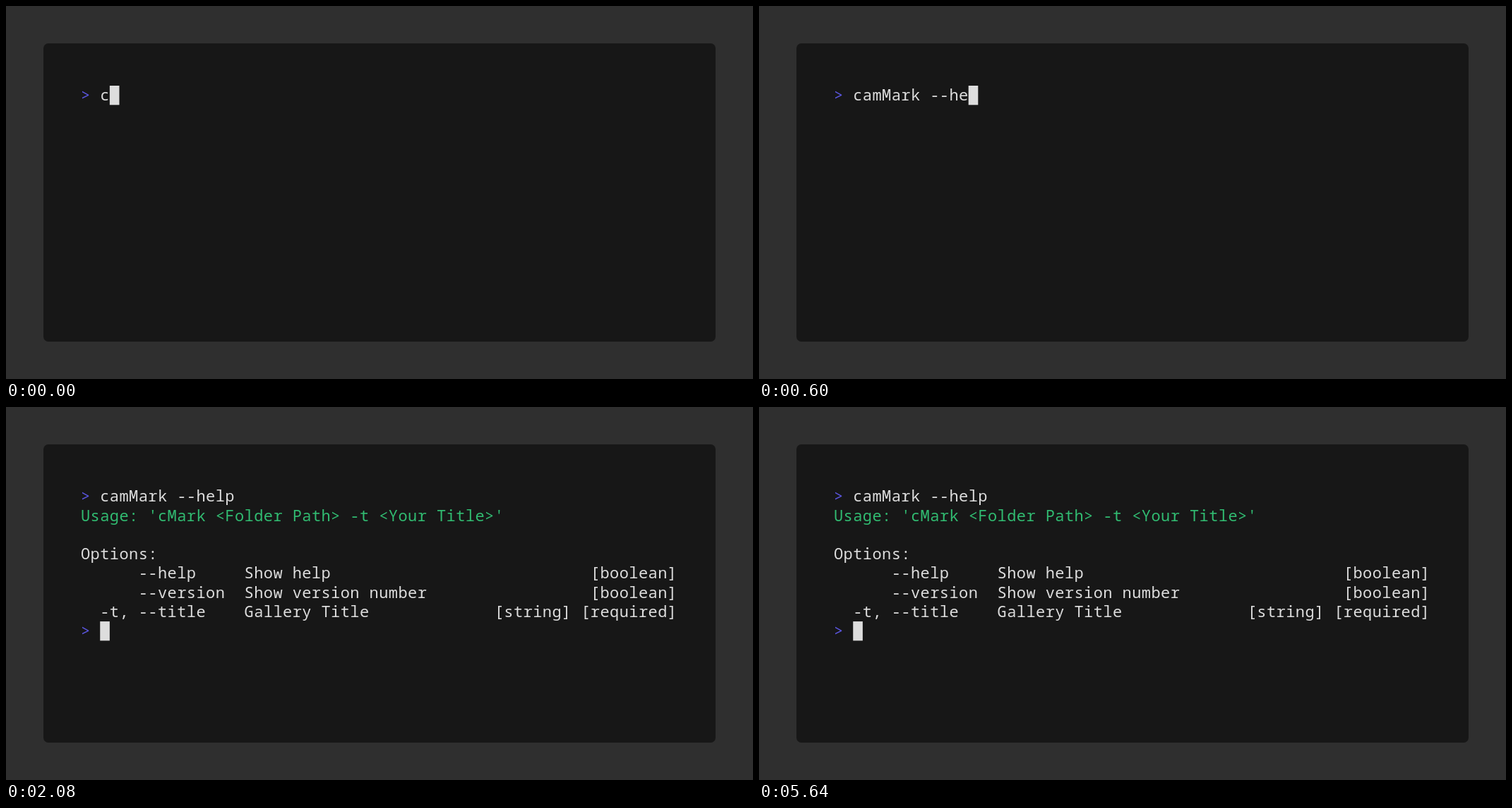
Write an HTML page that moves like this. It is 1058 by 529 pixels and loops after 5.76 s.

```html
<!DOCTYPE html>
<html lang="en">
<head>
<meta charset="utf-8">
<title>Terminal help</title>
<style>
  html, body { margin: 0; width: 100%; height: 100%; overflow: hidden; background: #2f2f2f; }
  svg { display: block; width: 1058px; height: 529px; }
  text {
    font: 22px "Noto Sans Mono", "DejaVu Sans Mono", monospace;
    letter-spacing: 0.42px;
    font-variant-ligatures: none;
    white-space: pre;
    fill: #ddd;
  }
  .prompt { fill: #5b56e0; }
  .usage { fill: #31bb71; }
  #cursor { fill: #ddd; }
</style>
</head>
<body>
<svg viewBox="0 0 1058 529">
  <rect x="53" y="53" width="952" height="423" rx="7" fill="#171717"/>
  <g id="screen"></g>
  <rect id="cursor"/>
</svg>
<script>
const LOOP = 5760;
const CELL = { w: 13.62, h: 27.3 };
const ORIGIN = { x: 106, y: 113 };
const BASELINE = 21.2;
const COMMAND = 'camMark --help';

// [time in ms, typed characters]
const KEYS = [[0, 1], [40, 2], [120, 3], [160, 4], [240, 5], [320, 7], [400, 8],
  [440, 9], [480, 10], [560, 11], [600, 12], [640, 13], [720, 14]];
const ENTER = 800;
const OUTPUT = 920;
const BLINKS = [1520, 2080, 2680, 3280, 3880, 4480, 5080, 5640];

const screen = document.getElementById('screen');
const cursor = document.getElementById('cursor');
const colX = col => ORIGIN.x + col * CELL.w;
const rowY = row => ORIGIN.y + row * CELL.h;

function addText(parent, col, row, content, cls = '') {
  const el = document.createElementNS('http://www.w3.org/2000/svg', 'text');
  el.setAttribute('x', colX(col));
  el.setAttribute('y', rowY(row) + BASELINE);
  el.setAttribute('class', cls);
  el.textContent = content;
  parent.append(el);
  return el;
}

addText(screen, 0, 0, '>', 'prompt');
const typed = addText(screen, 2, 0, '');

const output = document.createElementNS('http://www.w3.org/2000/svg', 'g');
screen.append(output);
addText(output, 0, 1, "Usage: 'cMark <Folder Path> -t <Your Title>'", 'usage');
addText(output, 0, 3, 'Options:');
[
  ['', '--help', 'Show help', '[boolean]'],
  ['-t,', '--version', 'Show version number', '[boolean]'],
  ['-t,', '--title', 'Gallery Title', '[string] [required]']
].forEach(([short, long, about, type], i) => {
  const row = 4 + i;
  if (i === 2) addText(output, 2, row, short);
  addText(output, 6, row, long);
  addText(output, 17, row, about);
  addText(output, 62 - type.length, row, type);
});
addText(output, 0, 7, '>', 'prompt');

cursor.setAttribute('width', CELL.w);
cursor.setAttribute('height', CELL.h);

function placeCursor(col, row) {
  cursor.setAttribute('x', colX(col));
  cursor.setAttribute('y', rowY(row));
}

function draw(t) {
  const count = KEYS.filter(([at]) => at <= t).pop()[1];
  const text = COMMAND.slice(0, count);
  if (typed.textContent !== text) typed.textContent = text;

  const done = t >= OUTPUT;
  output.setAttribute('visibility', done ? 'visible' : 'hidden');
  if (done) placeCursor(2, 7);
  else if (t >= ENTER) placeCursor(0, 1);
  else placeCursor(2 + count, 0);

  const toggles = BLINKS.filter(at => at <= t).length;
  cursor.setAttribute('visibility', toggles % 2 ? 'hidden' : 'visible');
}

function tick() {
  draw(performance.now() % LOOP);
  requestAnimationFrame(tick);
}
tick();
</script>
</body>
</html>
```
